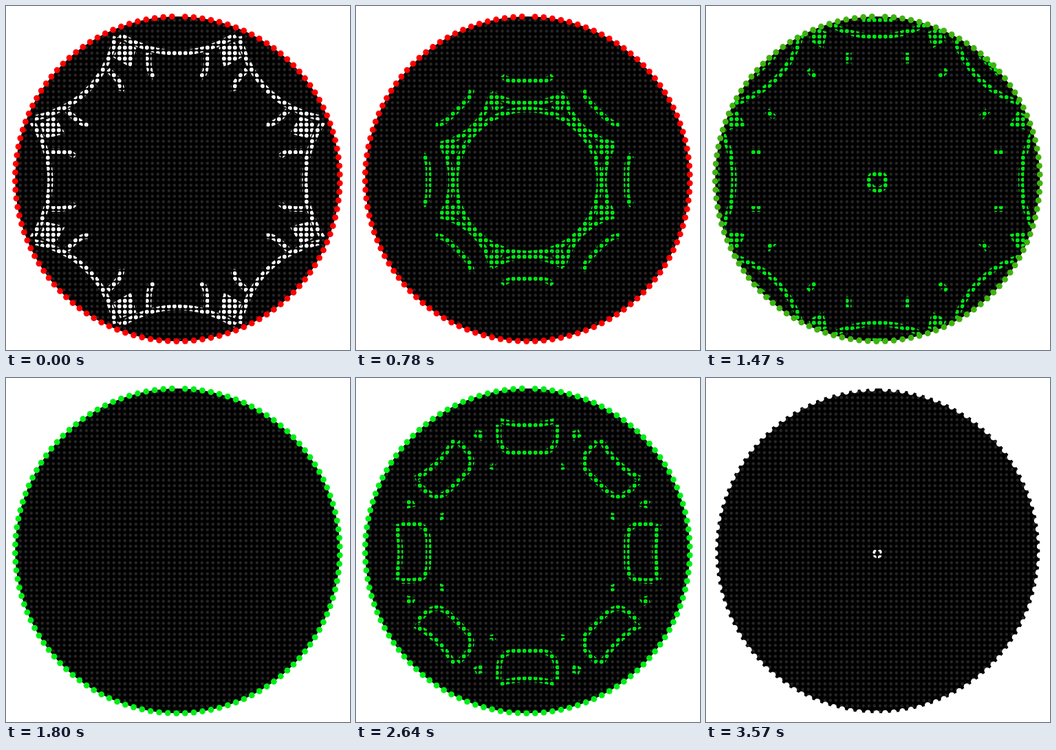
An HTML page with a canvas for the animation above (3600 ms loop, 500x500 px).

```html
<!DOCTYPE html>
<html lang="en">
<head>
<meta charset="utf-8">
<title>Round LED panel</title>
<style>
  html, body { margin: 0; width: 100%; height: 100%; overflow: hidden; background: #fff; }
  canvas { display: block; }
</style>
</head>
<body>
<canvas id="stage" width="500" height="500"></canvas>
<script>
const LOOP = 3600, STEP = 30, PITCH = 8;
const DISC = { x: 249.3, y: 251.3, r: 236 };
const CENTER = { x: 249.3, y: 253 };
const WHITE = [255, 255, 255], RED = [255, 0, 0], GREEN = [0, 238, 22];

const newCanvas = () => Object.assign(document.createElement('canvas'), { width: 500, height: 500 });
const ctx = document.getElementById('stage').getContext('2d');
const layer = newCanvas(), art = layer.getContext('2d');

// Progress from 0 to 1 between two times
const ramp = (t, from, to) => Math.min(1, Math.max(0, (t - from) / (to - from)));
const mix = (a, b, k) => a.map((v, i) => v + (b[i] - v) * k);
const rgb = c => `rgb(${c.map(Math.round)})`;

function dot(c, x, y, r) {
  c.beginPath();
  c.arc(x, y, r, 0, 7);
  c.fill();
}

function ledGrid(radius, color) {
  const canvas = newCanvas(), c = canvas.getContext('2d');
  c.fillStyle = color;
  for (let y = 4.5; y < 500; y += PITCH)
    for (let x = 4.8; x < 500; x += PITCH)
      if (Math.hypot(x - DISC.x, y - DISC.y) < DISC.r - 2) dot(c, x, y, radius);
  return canvas;
}
const dimLeds = ledGrid(2.2, '#262626'), holes = ledGrid(2.9, '#fff');

// Curves of one half sector: s in 0..1 gives [distance along the axis, offset from it]
const arch = s => [185 + 26 * s * s, 84 * s];
const star = s => [111 + 15 * (1 - s) ** 2, 52.5 * (1 - s)];
const spur = s => [126 - 26 * s, 52.5 - 6 * s];
const edge = s => [234, 22 * s];
function pocket(s) {
  const a = s * Math.PI / 2;
  return [185 - 41 * Math.sqrt(Math.sin(a)), 42 * Math.sqrt(Math.abs(Math.cos(a)))];
}

function halfSectors(draw) {
  art.lineWidth = PITCH;
  for (let i = 0; i < 16; i++) {
    art.save();
    art.translate(CENTER.x, CENTER.y);
    art.rotate((i >> 1) * Math.PI / 4);
    if (i % 2) art.scale(-1, 1);
    draw();
    art.restore();
  }
}

// Strokes the part of a curve between the fractions from and to
function trace(curve, from, to, shift = 0) {
  if (to <= from) return;
  art.beginPath();
  for (let i = 0; i <= 32; i++) {
    const [u, v] = curve(from + (to - from) * i / 32);
    art.lineTo(v, -u - shift);
  }
  art.stroke();
}

function kite(r, size) {
  if (size <= 0) return;
  art.save();
  art.rotate(Math.PI / 8);
  art.beginPath();
  art.moveTo(0, -r - size);
  art.lineTo(-size * .9, -r - size * .2);
  art.lineTo(0, -r + size);
  art.lineTo(size * .9, -r - size * .2);
  art.fill();
  art.restore();
}

function wave(p) {
  const enter = ramp(p, 0, 130), shrink = ramp(p, 130, 720), vanish = ramp(p, 720, 910);
  const grow = ramp(p, 700, 900), leave = ramp(p, 910, 1010);
  halfSectors(() => {
    trace(arch, 0, 1 - .52 * shrink - .48 * vanish, 50 * (1 - enter));
    trace(pocket, .45 * vanish + .55 * leave, .55 * enter + .45 * shrink);
    kite(245 - 48 * enter - 13 * shrink, 20 * enter - 11 * shrink - 9 * vanish);
    trace(star, leave, grow);
    trace(spur, leave, grow);
  });

  const fall = ramp(p, 900, 1690), r = 106 * (1 - fall);
  if (fall > 0 && r > 0) {
    art.lineWidth = Math.min(8 + 5 * fall, r * .7);
    art.beginPath();
    art.arc(CENTER.x, CENTER.y + 2, r, 0, 7);
    art.stroke();
  }
}

function rimSurge(k) {
  if (k <= 0) return;
  halfSectors(() => {
    trace(arch, 0, 1, 50 * (1 - k));
    trace(pocket, 0, .17 * k);
    kite(245 - 41 * k, 31 * k);
    trace(edge, 0, 1);
  });
}

function render(t) {
  ctx.fillStyle = '#fff';
  ctx.fillRect(0, 0, 500, 500);
  ctx.fillStyle = '#000';
  dot(ctx, DISC.x, DISC.y, DISC.r);
  ctx.drawImage(dimLeds, 0, 0);

  art.clearRect(0, 0, 500, 500);
  art.fillStyle = art.strokeStyle =
    rgb(mix(WHITE, GREEN, ramp(t, 0, 600) - ramp(t, 3270, 3540)));
  if (t < 1890) wave(t + 130);
  else if (t >= 1920) wave(t - 1920);
  rimSurge(ramp(t, 1080, 1200) - ramp(t, 1200, 1770));
  art.globalCompositeOperation = 'destination-in';
  art.drawImage(holes, 0, 0);
  art.globalCompositeOperation = 'source-over';
  ctx.drawImage(layer, 0, 0);

  const rim = mix(RED, GREEN, ramp(t, 930, 1650));
  ctx.fillStyle = rgb(mix(rim, WHITE, ramp(t, 2700, 3570)));
  for (let i = 0; i < 117; i++) {
    const a = (2.67 + i * 3.0637) * Math.PI / 180;
    dot(ctx, DISC.x + DISC.r * Math.sin(a), DISC.y - DISC.r * Math.cos(a), 4.4);
  }
}

const start = performance.now();
function tick() {
  const t = (performance.now() - start) % LOOP;
  render(Math.floor(t / STEP) * STEP);
  requestAnimationFrame(tick);
}
tick();
</script>
</body>
</html>
```
